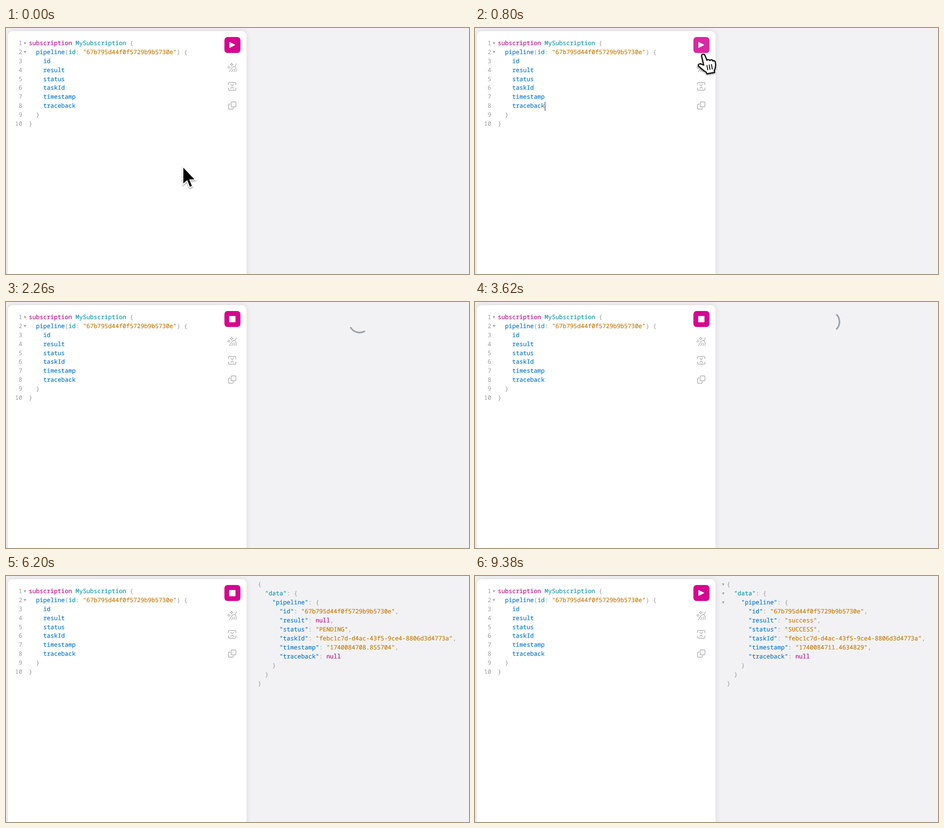
Recreate the animation shown at these times as an HTML page. Size 1026 px wide and 546 px high, loop 9.84 s.

```html
<!DOCTYPE html>
<html lang="en">
<head>
<meta charset="utf-8">
<title>Subscription demo</title>
<style>
html, body { margin: 0; height: 100%; overflow: hidden; background: #f2f2f4; }
svg { display: block; width: 100vw; height: 100vh; }
text {
  font: 500 13.333px "Noto Sans Mono", "DejaVu Sans Mono", monospace;
  white-space: pre; text-rendering: geometricPrecision;
}
tspan { fill: currentColor; stroke: currentColor; stroke-width: .2; }
.keyword { color: #b8128a; }
.def { color: #1797ab; }
.prop { color: #0b78cc; }
.string { color: #c67b0a; }
.punct { color: #a4a5a9; }
.fold { fill: #a4a5a9; }
.number { fill: #9c9da1; text-anchor: end; font-weight: 400; }
.icon { fill: none; stroke: #a9aaae; stroke-width: 1.4; stroke-linecap: round; stroke-linejoin: round; }
#panel { filter: drop-shadow(0 0 6px #0000001c); }
#cursor { filter: drop-shadow(0 2px 1.5px #0006); }
</style>
</head>
<body>
<svg viewBox="0 0 1026 546">
  <defs>
    <path id="arrow" d="M1.5 4V39L10 31.5L16 46.5L20.5 44.5L14.5 30H26Z"
      stroke="#fff" stroke-width="4" paint-order="stroke"/>
    <g id="hand" fill="#fff" stroke="#111" stroke-width="2.4" stroke-linejoin="round" stroke-linecap="round">
      <path d="M-3 4C-4.500-1 2-2.500 4 2L8.500 13C10 10 14 11 15 13.500C18 10 21 12 22 14.500C25 12.500 27 15 27 18C28.500 25 27 31 24.500 36L25.500 39.500L8.500 42.500L6.500 38.500C1 36-2 33-10 25.500C-12.500 21-6.500 19.500-2.500 22L1.500 23.500Z"/>
      <path d="M8.500 24l1.800 10M13.500 23l1.800 10M18.500 22l1.800 10" stroke-width="2"/>
    </g>
  </defs>
  <rect id="panel" x="4" y="7" width="529" height="570" rx="11" fill="#fff"/>
  <g id="query"></g>
  <path id="caret" d="M155.300 164v20" stroke="#444" stroke-width="1.300"/>
  <rect id="button" rx="7"/>
  <path id="play" d="M495.500 31.500L507.500 37.600L495.500 43.700Z" fill="#fff" stroke="#fff" stroke-linejoin="round"/>
  <rect id="stop" x="494.500" y="31" width="14" height="14" rx="1" fill="#fff"/>
  <g class="icon">
    <path d="M500 77.500q.5 3 3.500 3.500q-3 .5-3.500 3.500q-.5-3-3.500-3.500q3-.5 3.500-3.500ZM494 84q.5 2.500 3 3q-2.500 .5-3 3q-.5-2.500-3-3q2.500-.5 3-3Z" stroke-width="1.100"/>
    <path d="M511 79l-4 7q4 2 2.500 11M507 86q-5-1-7 3q-1.500 4-5 8M503 91q-1 4-3 6M506.500 91q0 4-1.500 6" stroke-width="1.300"/>
    <path d="M493 126v-3q0-2 2-2h12.500q2 0 2 2v3M493 133v3q0 2 2 2h12.500q2 0 2-2v-3M498 125l3.200 3l3.200-3M498 134l3.200-3l3.200 3"/>
    <rect x="499" y="164" width="10.500" height="11" rx="2"/>
    <path d="M496.500 169h-1.500q-2 0-2 2v7.200q0 2 2 2h6.700q2 0 2-2v-1"/>
  </g>
  <path id="spinner" d="M-16.800-16.800A23.700 23.700 0 0 1 16.800-16.800" fill="none" stroke="#9fa4ac" stroke-width="3.600"/>
  <g id="response"></g>
  <g id="folds"></g>
  <g id="cursor"></g>
</svg>
<script>
const LOOP = 9840, SENT = 1220, FIRST = 5160, DONE = 8800, CHAR = 8;
const PIPELINE = '"67b795d44f0f5729b9b5730e"';
const $ = id => document.getElementById(id);
const show = (id, on) => $(id).setAttribute('visibility', on ? 'visible' : 'hidden');
const set = (el, attrs) => { for (const key in attrs) el.setAttribute(key, attrs[key]); };

function kind(token, next) {
  if (/^(subscription|null)$/.test(token)) return 'keyword';
  if (/^(MySubscription|"data")$/.test(token) || token === 'id' && next === ':') return 'def';
  if (token[0] === '"') return next === ':' ? 'prop' : 'string';
  return /\w/.test(token) ? 'prop' : 'punct';
}

function codeLine(line, x, y) {
  const indent = line.search(/\S/);
  const spans = line.trim().replace(/"[^"]*"|\w+|[^\w"]+/g, (token, at, all) =>
    `<tspan class="${kind(token, all[at + token.length])}">${token}</tspan>`);
  return `<text x="${x + indent * CHAR}" y="${y}">${spans}</text>`;
}

const fold = (x, y) => `<path class="fold" d="M${x - 2.8} ${y - 2.5}h5.600l-2.800 5.500Z"/>`;

const query = `subscription MySubscription {
  pipeline(id: ${PIPELINE}) {
    id
    result
    status
    taskId
    timestamp
    traceback
  }
}`.split('\n');
$('query').innerHTML = query.map((line, i) => {
  const y = 37.7 + 19.95 * i;
  return `<text class="number" x="36" y="${y}">${i + 1}</text>` + codeLine(line, 50.4, y);
}).join('') + fold(42, 34) + fold(42, 53.5);
$('folds').innerHTML = [19, 39, 59].map(y => fold(550, y)).join('');

// Each message replaces the whole response.
const messages = [
  [FIRST, '07.812391'], [5680, '08.334056'], [6200, '08.855704'], [6720, '09.377218'],
  [7240, '09.898735'], [7780, '10.4203641'], [8280, '10.9419274'], [DONE, '11.4634829']
];
let shown;
function drawResponse(t) {
  const message = messages.filter(m => m[0] <= t).pop();
  if (message === shown) return;
  shown = message;
  if (!message) { $('response').innerHTML = ''; return; }
  const done = message[0] === DONE;
  $('response').innerHTML = `{
  "data": {
    "pipeline": {
      "id": ${PIPELINE},
      "result": ${done ? '"success"' : 'null'},
      "status": "${done ? 'SUCCESS' : 'PENDING'}",
      "taskId": "febc1c7d-d4ac-43f5-9ce4-8806d3d4773a",
      "timestamp": "17400847${message[1]}",
      "traceback": null
    }
  }
}`.split('\n').map((line, i) => codeLine(line, 558, 23.2 + 19.97 * i)).join('');
}

const unit = v => Math.max(0, Math.min(1, v));
const smooth = v => (v = unit(v), v * v * (3 - 2 * v));

function cursorAt(t) {
  if (t < 1340) {
    const u = smooth((t - 20) / 680), rise = 7 * smooth((t - 850) / 250);
    const curve = (a, b, c) => (1 - u) ** 2 * a + 2 * u * (1 - u) * b + u * u * c;
    return [curve(391.5, 470, 505.5), curve(306, 260, 59) - rise];
  }
  const u = unit((t - 1340) / 360) ** 2.2;
  return [505.5 - 565 * u, 52 + 418 * u];
}

// Stacked copies with falling opacity average into motion blur.
const COPIES = 10, EXPOSURE = 20;
$('cursor').innerHTML = Array.from({length: COPIES}, (_, i) => `<use opacity="${1 / (i + 1)}"/>`).join('');
function drawCursor(t) {
  const shape = t > 560 && t < 1500 ? '#hand' : '#arrow';
  [...$('cursor').children].forEach((copy, i) => {
    const [x, y] = cursorAt(Math.max(0, t + EXPOSURE * (i / (COPIES - 1) - .5)));
    set(copy, {href: shape, transform: `translate(${x} ${y})`});
  });
  show('cursor', t < 1720);
}

function draw(t) {
  const running = t >= SENT && t < DONE;
  const hover = t > 640 && t < SENT;
  const grow = t >= SENT && t < 1900 ? .8 : 0;
  set($('button'), {
    x: 484 - grow, y: 20 - grow, width: 35.5 + 2 * grow, height: 35.5 + 2 * grow,
    fill: hover ? '#da289f' : '#d60590'
  });
  show('play', !running);
  show('stop', running);
  show('caret', t >= 530 && t < 1060);
  show('spinner', t >= SENT && t < FIRST);
  set($('spinner'), {transform: `translate(783.8 44) rotate(${194.5 + (t - 2260) * .4525})`});
  show('folds', t >= 5560 && t < 5680 || t >= 9380);
  drawResponse(t);
  drawCursor(t);
}

const start = performance.now();
function tick() {
  draw((performance.now() - start) % LOOP);
  requestAnimationFrame(tick);
}
tick();
</script>
</body>
</html>
```
